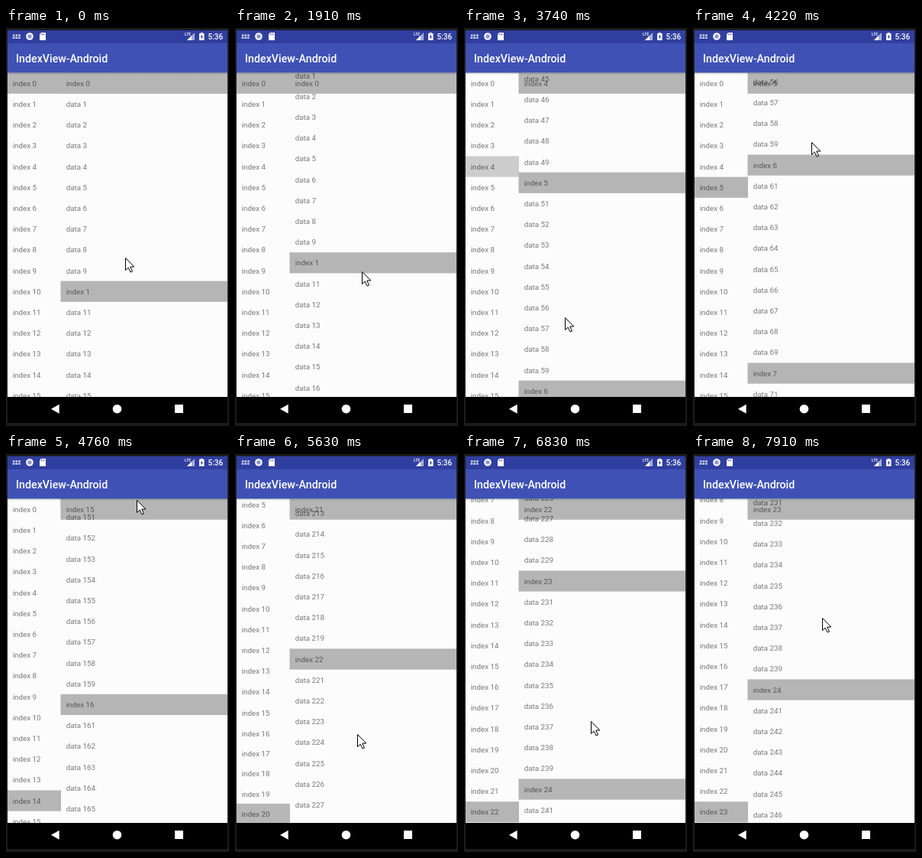
These frames come from a looping animation (292 by 520 pixels, 8 s). An HTML page with a canvas:

```html
<!DOCTYPE html>
<html lang="en">
<head>
<meta charset="utf-8">
<title>IndexView-Android</title>
<style>
html, body { margin: 0; width: 100%; height: 100%; overflow: hidden; background: #1c1c1c; }
canvas { display: block; width: 292px; height: 520px; }
</style>
</head>
<body>
<canvas id="stage"></canvas>
<script>
const W = 292, H = 520, LOOP = 8000;
const ROW = 27.2, TOP = 58.6, BOTTOM = 482, SPLIT = 71.5, SECTION = ROW * 10;
const LAG = 80;
const GREY = '#b5b5b5', INK = 'rgba(0,0,0,.52)';

// The screen refreshes in even steps within these spans and holds between them.
const SPANS = [[0, 0, 1], [580, 940, 3], [1220, 1490, 2], [1910, 3740, 13],
  [3740, 4760, 8], [4760, 5630, 6], [5630, 6830, 9], [7100, 7910, 6]];

// Turning points of the mouse: time, x, y
const TURNS = [[460, 156, 300], [940, 164, 372], [1910, 166, 318], [2300, 160, 180],
  [3740, 132, 378], [4340, 168, 19], [4760, 171, 60], [5630, 160, 366], [6830, 166, 349]];

const canvas = document.getElementById('stage');
const ctx = canvas.getContext('2d');
const dpr = window.devicePixelRatio || 1;
canvas.width = W * dpr;
canvas.height = H * dpr;

const clamp = v => Math.max(0, Math.min(1, v));
const progress = (t, from, to) => clamp((t - from) / (to - from));
const mix = (a, b, u) => a + (b - a) * u;

function refreshTime(t) {
  const [from, to, steps] = SPANS.filter(s => s[0] <= t).pop();
  const step = (to - from) / steps;
  return step ? Math.min(to, from + step * Math.floor((t - from) / step + 1e-6)) : from;
}

const lastDrag = t => 1 - (1 - progress(t, 7000, 7910)) ** 2;

function scrollAt(t) {
  const drag = 37.4 * progress(t, 1150, 1910) + .6517 * Math.max(0, t - 1910);
  const fling = 6162.2 - 2065.4 * Math.max(0, (6666 - t) / 1906) ** 2.803;
  return Math.max(drag, fling) + 130 * lastDrag(t);
}

function pointerAt(t) {
  const next = TURNS.findIndex(k => k[0] > t);
  const b = TURNS.at(next), a = next > 0 ? TURNS[next - 1] : b;
  const u = a === b ? 0 : progress(t, a[0], b[0]);
  const e = lastDrag(t);
  return [mix(a[1], b[1], u) + 3 * e, mix(a[2], b[2], u) - 135 * e];
}

const sectionAt = t => Math.floor(scrollAt(t) / SECTION + 1e-6);

// The index list trails the data list, fading and sliding to its new selection.
function selectionAt(t) {
  const late = t - LAG, index = sectionAt(late);
  let age = 0;
  while (age < 600 && sectionAt(late - age) === index) age += 10;
  const speed = (scrollAt(t) - scrollAt(t - 10)) / 10;
  const ease = clamp(age / 260);
  const end = i => Math.max(0, i * ROW - 395.6);
  return {
    index,
    alpha: clamp(age / 300 + speed * .3),
    offset: mix(end(index - 1), end(index), ease),
    tuck: index > 14 ? Math.min(1, 4 * (1 - ease)) : 0
  };
}

function box(x, y, w, h, color) {
  ctx.fillStyle = color;
  ctx.fillRect(x, y, w, h);
}

function label(text, x, baseline, font, color) {
  ctx.font = font + ' Roboto, sans-serif';
  ctx.fillStyle = color;
  ctx.fillText(text, x, baseline);
}

function shape(points, fill, stroke) {
  ctx.beginPath();
  points.forEach(([x, y]) => ctx.lineTo(x, y));
  ctx.closePath();
  ctx.fillStyle = fill;
  ctx.fill();
  if (stroke) { ctx.strokeStyle = stroke; ctx.lineWidth = 1; ctx.stroke(); }
}

function disc(x, y, r, color) {
  ctx.beginPath();
  ctx.arc(x, y, r, 0, 7);
  ctx.fillStyle = color;
  ctx.fill();
}

const rowText = (text, x, top) => label(text, x, top + 17.2, '9.8px', INK);
const rowsFrom = scroll => Array.from({ length: 18 }, (_, k) => Math.floor(scroll / ROW) + k);

function indexList(t) {
  const s = selectionAt(t);
  for (const i of rowsFrom(s.offset)) {
    const y = TOP + i * ROW - s.offset - Math.max(0, i - s.index + 4) * s.tuck;
    if (i === s.index) {
      ctx.globalAlpha = s.alpha;
      box(2, y, SPLIT - 1.5, ROW, GREY);
      ctx.globalAlpha = 1;
    }
    rowText('index ' + i, 8.7, y);
  }
}

function dataList(t) {
  const scroll = scrollAt(t), section = sectionAt(t);
  const header = y => box(SPLIT, y, 290 - SPLIT, ROW, GREY);
  const rows = rowsFrom(scroll).map(i => ({ i, y: TOP + i * ROW - scroll }));
  rows.filter(({ i }) => i % 10 === 0).forEach(({ y }) => header(y));
  header(TOP);
  for (const { i, y } of rows) {
    if (i !== section * 10) rowText(i % 10 ? 'data ' + i : 'index ' + i / 10, 78.7, y);
  }
  rowText('index ' + section, 78.7, TOP);
}

function statusBar() {
  box(2, 3, 288, 17, '#303f9f');
  for (let k = 0; k < 3; k++) {
    box(9 + k * 3.7, 8.5, 2.6, 2, '#e2e5f4');
    box(8.5 + k * 3.7, 11.5, 2.8, 2.5, '#c3c9e6');
  }
  disc(31, 11, 4.8, '#fff');
  disc(31, 11, 2.7, '#8f98cf');
  shape([[46, 6], [52, 6], [52, 16], [44, 16], [44, 8.5]], '#fff');
  for (let k = 0; k < 3; k++) box(46.2 + k * 1.7, 7.3, .8, 2, '#303f9f');
  label('LTE', 234, 10, '500 5px', '#fff');
  shape([[247, 6], [247, 16], [237, 16]], '#a5adda');
  shape([[243, 10], [243, 16], [237, 16]], '#fff');
  box(253, 7, 6.5, 9, '#fff');
  box(254.7, 6, 3, 1, '#fff');
  shape([[256.8, 8], [254.6, 12], [256, 12], [255.7, 15], [258, 11], [256.6, 11]], '#303f9f');
  label('5:36', 264.5, 15, '500 10px', '#fff');
}

function titleBar() {
  box(2, 20, 288, 38.4, '#3f51b5');
  label('IndexView-Android', 13, 44.5, '500 14.25px', '#fff');
}

function navigation() {
  box(2, BOTTOM, 288, 516 - BOTTOM, '#000');
  shape([[59, 497.7], [69.7, 491.7], [69.7, 503.7]], '#fff');
  disc(145.5, 497.7, 5.8, '#fff');
  box(221, 492, 11, 11, '#fff');
}

function pointer(t) {
  const [x, y] = pointerAt(t).map(v => Math.round(v) + .5);
  const arrow = [[0, 0], [0, 16], [3.7, 12.6], [6.5, 18.5], [9, 17.5], [6.3, 11.5], [11.3, 11.5]];
  shape(arrow.map(([dx, dy]) => [x + dx, y + dy]), '#fff', '#000');
}

function draw(t) {
  ctx.setTransform(dpr, 0, 0, dpr, 0, 0);
  box(0, 0, W, H, '#1c1c1c');
  box(2, 58, 288, BOTTOM - 58, '#fcfcfc');
  ctx.save();
  ctx.beginPath();
  ctx.rect(2, 58, 288, BOTTOM - 58);
  ctx.clip();
  indexList(t);
  dataList(t);
  const shade = ctx.createLinearGradient(0, 58, 0, 61);
  shade.addColorStop(0, 'rgba(0,0,0,.25)');
  shade.addColorStop(1, 'rgba(0,0,0,0)');
  box(2, 58, 288, 3, shade);
  ctx.restore();
  statusBar();
  titleBar();
  navigation();
  pointer(t);
}

const start = performance.now();
function frame() {
  draw(refreshTime((performance.now() - start) % LOOP));
  requestAnimationFrame(frame);
}
frame();
</script>
</body>
</html>
```
